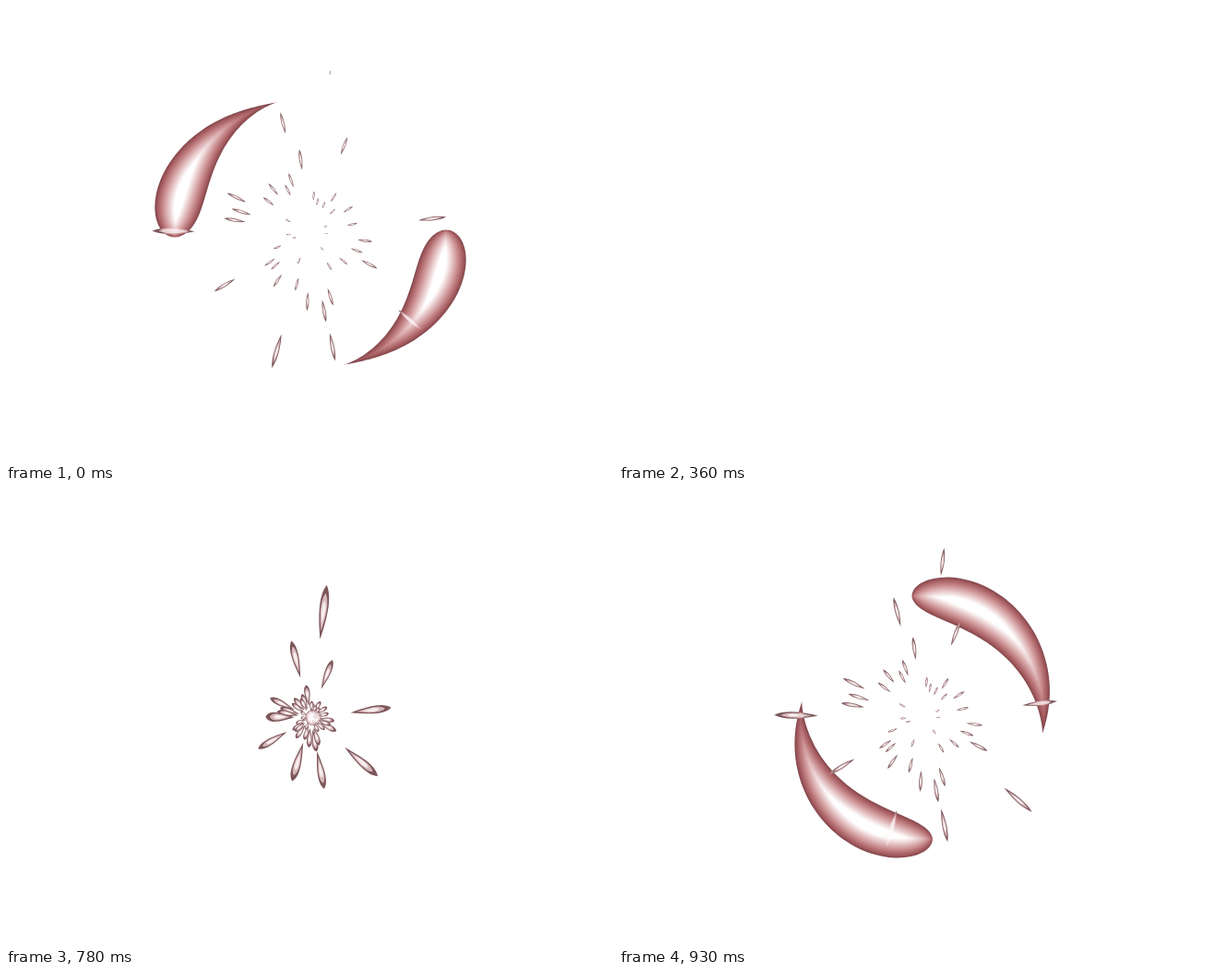
An HTML page with a canvas for the animation above (0.96 s loop, 658x494 px).

```html
<!DOCTYPE html>
<html lang="en">
<head>
<meta charset="utf-8">
<title>Swirling drops</title>
<style>
  html, body { margin: 0; width: 100%; height: 100%; overflow: hidden; background: #fff; }
  canvas { display: block; width: 658px; height: 494px; }
</style>
</head>
<body>
<canvas id="stage" width="658" height="494"></canvas>
<script>
const ctx = document.getElementById('stage').getContext('2d');
const LOOP = 960, STEP = 30, CX = 330, CY = 246.5, RAD = Math.PI / 180;
// Times run from -480 to 480 ms; the ring bursts out of the core at BURST
const BURST = -148, FADED = 335, CORE_START = -390, CORE_END = -150;
const lerp = (a, b, f) => a + (b - a) * f;
const clamp = (x, lo = 0, hi = 1) => Math.min(hi, Math.max(lo, x));

// From a dark red rim (0) to a white ridge (1)
function shade(f) {
  const g = clamp(f / .8);
  const mix = (rim, power) => Math.round(lerp(rim, 255, g ** power));
  return `rgb(${mix(132, .65)}, ${mix(74, 1.1)}, ${mix(78, 1.1)})`;
}

// A ring that opens into two blobs, which fly outwards, spin ever slower and shrink
function swirlAt(t) {
  const spin = Math.sqrt(Math.max(0, t + 35));
  const open = clamp((t + 120) / 90);
  const orbit = 190 * (1 - Math.exp((BURST - t) / 100));
  return {
    orbit,
    x: CX + 3.5 * Math.sin(t / 76),
    middle: 22.1 * spin - 93,
    span: clamp(117 - 6.5 * spin + 2.4 * Math.max(0, -35 - t), 3, 181),
    width: Math.min(26, orbit * .46, 26 * (1 - t / FADED)),
    inward: 1.8 - .8 * open,
    head: .5 * open,
    tail: (.85 + .13 * spin) * open
  };
}

function drawSwirl(t) {
  if (t < BURST || t >= FADED) return;
  const { orbit, x, middle, span, width, inward, head, tail } = swirlAt(t);
  const profile = s => s ** head * (1 - s) ** tail;
  const peak = profile(head / (head + tail) || 0);
  const layers = 22, n = 80;
  for (let k = 0; k < layers; k++) {
    ctx.fillStyle = shade(k / layers);
    for (const turn of [0, 180]) {
      const outer = [], inner = [];
      for (let i = 0; i <= n; i++) {
        const f = i / n, s = f * f * (3 - 2 * f);
        const half = width * (profile(s) / peak - k / layers);
        if (half <= 0) continue;
        const angle = (middle + span * (s - .5) + turn) * RAD;
        const at = r => [x + r * Math.cos(angle), CY + r * Math.sin(angle)];
        outer.push(at(orbit + half));
        inner.unshift(at(orbit - half * inward));
      }
      ctx.beginPath();
      for (const p of outer.concat(inner)) ctx.lineTo(...p);
      ctx.fill();
    }
  }
}

let seed = 11;
const rand = () => (seed = seed * 16807 % 2147483647) / 2147483647;

// A droplet slows down on its way out; near and far are its radii at -180 and -30 ms
const DRAG = 140, LEFT = Math.exp(-150 / DRAG);
function makeDrop([angle, near, far]) {
  const limit = (far - LEFT * near) / (1 - LEFT);
  return {
    angle: angle * RAD,
    limit,
    born: -180 - DRAG * Math.log(limit / (limit - near)),
    life: 250 + far - near,
    len: .35 * far,
    width: 2 + .06 * far
  };
}

const spikes = [
  [-83, 115, 170], [-104, 65, 118], [-69, 50, 97], [-7, 66, 127], [41, 73, 136],
  [79, 58, 119], [106, 50, 125], [149, 48, 103], [181, 33, 138], [206, 34, 84]
];
const spray = Array.from({ length: 34 }, (_, i) => {
  const far = 16 + 72 * rand();
  return [i * 137.5, far * .32, far];
});
const drops = spikes.concat(spray).map(makeDrop);

// Round at the front when fresh, a plain needle when old
function leaf(len, width, age) {
  const h = len / 2, w = width / 2;
  const backY = w * lerp(.6, 1.33, age);
  const frontX = h * lerp(.7, .3, age), frontY = w * lerp(2, 1.33, age);
  ctx.beginPath();
  ctx.moveTo(-h, 0);
  ctx.bezierCurveTo(-h * .3, -backY, frontX, -frontY, h, 0);
  ctx.bezierCurveTo(frontX, frontY, -h * .3, backY, -h, 0);
  ctx.fill();
}

function drawDrops(t, layers) {
  for (const d of drops) {
    const age = t - d.born, q = age / d.life;
    if (q <= 0 || q >= 1) continue;
    const r = d.limit * (1 - Math.exp(-age / DRAG));
    const len = Math.min(d.len, r * .95) * (1 - q ** 6);
    const width = d.width * Math.sqrt(1 - q);
    ctx.save();
    ctx.translate(CX, CY);
    ctx.rotate(d.angle);
    ctx.translate(r, 0);
    for (const [color, scale] of layers) {
      ctx.fillStyle = color;
      leaf(len * scale, width * scale, q);
    }
    ctx.restore();
  }
}

function drawCore(t) {
  if (t < CORE_START || t > CORE_END) return;
  const f = (t - CORE_START) / (CORE_END - CORE_START);
  const r = lerp(20.8, 7, f), x = CX + 4 * f * f;
  const fill = ctx.createRadialGradient(x, CY, 0, x, CY, r);
  fill.addColorStop(.45, '#fff');
  fill.addColorStop(.72, '#e8ccce');
  fill.addColorStop(.9, '#b57b80');
  fill.addColorStop(1, '#7c484c');
  ctx.globalAlpha = 1 - .4 * f;
  ctx.fillStyle = fill;
  ctx.beginPath();
  ctx.arc(x, CY, r, 0, 2 * Math.PI);
  ctx.fill();
  ctx.globalAlpha = 1;
}

function draw(t) {
  ctx.globalCompositeOperation = 'source-over';
  ctx.clearRect(0, 0, 658, 494);
  drawSwirl(t);
  // Droplets shine where they cross the swirl
  ctx.globalCompositeOperation = 'source-atop';
  drawDrops(t, [['rgba(255, 240, 241, .4)', 1], ['rgba(255, 255, 255, .6)', .7]]);
  // and lie behind it elsewhere, so their light parts come first
  ctx.globalCompositeOperation = 'destination-over';
  drawCore(t);
  drawDrops(t, [['#f8eff0', .42], ['#d6b8bb', .7], ['#7c5659', 1]]);
}

const start = performance.now();
function tick() {
  const step = Math.floor((performance.now() - start) % LOOP / STEP) * STEP;
  draw(step > LOOP / 2 ? step - LOOP : step);
  requestAnimationFrame(tick);
}
tick();
</script>
</body>
</html>
```
